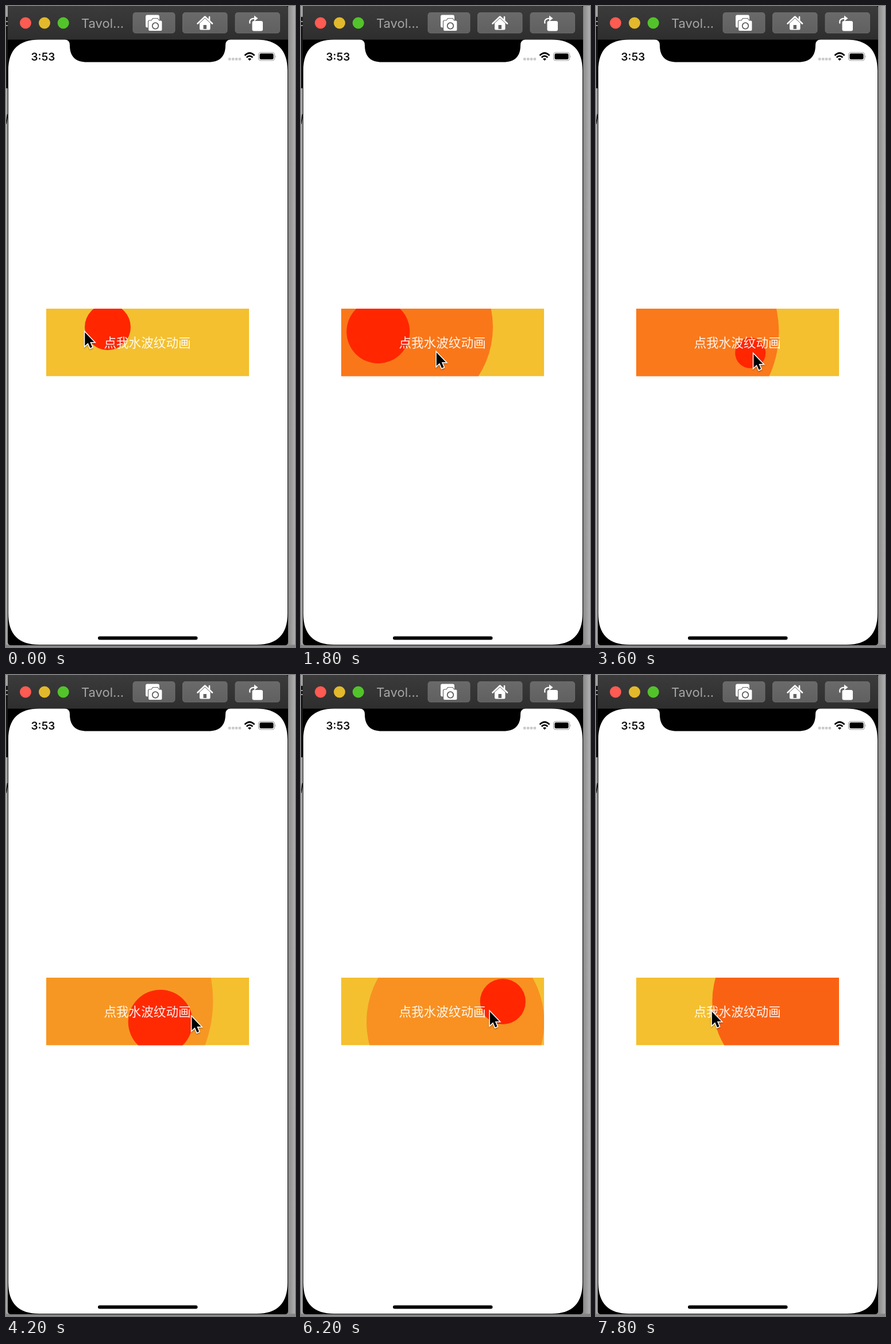
Animation of 503x1114 px, one loop 8000 ms. Source, as an HTML page:

```html
<!DOCTYPE html>
<html lang="zh-CN">
<head>
<meta charset="utf-8">
<title>Ripple button</title>
<style>
  html, body { margin: 0; width: 100%; height: 100%; overflow: hidden; background: #a5a5a5; }
  svg { display: block; width: 503px; height: 1114px; }
  .title { font: 22px Inter, "Liberation Sans", sans-serif; fill: #a6a6a6; }
  .clock { font: 600 19px Inter, "Liberation Sans", sans-serif; fill: #111; }
  .label { font: 21.6px "Noto Sans CJK SC", "Noto Sans CJK", sans-serif; fill: #fff; fill-opacity: .93; text-anchor: middle; }
</style>
</head>
<body>
<svg viewBox="0 0 503 1114">
  <defs>
    <linearGradient id="bar" x2="0" y2="1">
      <stop stop-color="#3b3b3b"/><stop offset="1" stop-color="#2e2e2e"/>
    </linearGradient>
    <linearGradient id="key" x2="0" y2="1">
      <stop stop-color="#6a6a6a"/><stop offset="1" stop-color="#606060"/>
    </linearGradient>
    <linearGradient id="shade">
      <stop stop-color="#858585"/><stop offset="1" stop-color="#b0b0b0"/>
    </linearGradient>
    <clipPath id="button"><rect x="70" y="526" width="353" height="117.5"/></clipPath>
    <filter id="drop" x="-50%" y="-50%" width="200%" height="200%">
      <feDropShadow dx="0" dy="1.5" stdDeviation="1.2" flood-opacity=".35"/>
    </filter>
  </defs>

  <!-- desktop behind the window -->
  <rect width="503" height="1114" fill="#a5a5a5"/>
  <rect y="18" width="4" height="125" fill="#161616"/>
  <path d="M0 18H3M0 27H3M0 34H3" stroke="#999" stroke-width="2"/>
  <path d="M0 205L3 188" stroke="#222" stroke-width="2"/>
  <rect x="490" width="13" height="1114" fill="url(#shade)"/>
  <rect y="1110" width="503" height="4" fill="#858585"/>

  <!-- window and screen -->
  <path d="M3 0H491V1105Q491 1111 485 1111H9Q3 1111 3 1105Z" fill="#000"/>
  <path d="M3 0H488Q491 0 491 4V58.5H3Z" fill="url(#bar)"/>
  <path fill="#fff" d="M4 112C4 76 22 58.500 58 58.500H102Q111 58.500 111 68C111 88 121 97.500 141 97.500H352C372 97.500 382 88 382 68Q382 58.500 391 58.500H436C472 58.500 490 76 490 112V1056C490 1092 472 1110 436 1110H58C22 1110 4 1092 4 1056Z"/>

  <!-- title bar -->
  <circle cx="34" cy="29.500" r="10" fill="#fe5b52"/>
  <circle cx="67" cy="29.500" r="10" fill="#e2b92c"/>
  <circle cx="99.700" cy="29.500" r="10" fill="#53c32b"/>
  <text class="title" x="131" y="37.500">Tavol...</text>
  <g fill="url(#key)" stroke="#747474" stroke-width=".8">
    <rect x="221" y="11.500" width="73" height="35.500" rx="4.500"/>
    <rect x="307.500" y="11.500" width="77.500" height="35.500" rx="4.500"/>
    <rect x="399" y="11.500" width="77.500" height="35.500" rx="4.500"/>
  </g>
  <g fill="#fff">
    <rect x="243" y="15.500" width="24" height="22" rx="3"/>
    <path d="M250 25H253L255.500 21.500H264L266.500 25H269.500Q272 25 272 27.500V41Q272 43.500 269.500 43.500H250Q247.500 43.500 247.500 41V27.500Q247.500 25 250 25Z" stroke="#656565" stroke-width="1.200"/>
    <circle cx="260" cy="34.500" r="5.300" stroke="#606060" stroke-width="1.800"/>
    <path d="M337 30L346.300 21.500L355.500 30V39.500Q355.500 41.500 353.500 41.500H339Q337 41.500 337 39.500Z"/>
    <path d="M333.500 30.500L346.300 18.500L359 30.500M354 19V25" fill="none" stroke="#fff" stroke-width="2.600" stroke-linecap="round" stroke-linejoin="round"/>
    <rect x="343.500" y="33" width="5.500" height="7" fill="#626262"/>
    <rect x="428.500" y="26" width="18.500" height="17.500" rx="3"/>
    <path d="M424.500 30.500C423 24 427 21.500 433 21.500" fill="none" stroke="#fff" stroke-width="2.200"/>
    <path d="M432 16.500L438.500 21.500L432 26.500Z"/>
  </g>

  <!-- status bar -->
  <text class="clock" x="43.500" y="94.500">3:53</text>
  <g fill="#cbcbcb">
    <rect x="387" y="90" width="4.500" height="4.500" rx="1"/>
    <rect x="393" y="90" width="4.500" height="4.500" rx="1"/>
    <rect x="398.800" y="90" width="4.500" height="4.500" rx="1"/>
    <rect x="404.600" y="90" width="4.500" height="4.500" rx="1"/>
  </g>
  <g fill="none" stroke="#000" stroke-width="2.700">
    <path d="M415.500 86Q424 77.500 432.500 86"/>
    <path d="M418.700 89.500Q424 84.300 429.300 89.500"/>
  </g>
  <path d="M421 92Q424 89.500 427 92L424 95Z"/>
  <rect x="439.500" y="80.700" width="28" height="14" rx="4" fill="none" stroke="#999" stroke-width="1.100"/>
  <rect x="441.400" y="82.600" width="24.200" height="10.200" rx="2.400"/>
  <path d="M468.700 85.500Q470.500 87.700 468.700 90Z" fill="#999"/>
  <rect x="160" y="1095.500" width="173.500" height="6" rx="3"/>

  <!-- button -->
  <g clip-path="url(#button)">
    <rect x="70" y="526" width="353" height="117.500" fill="#f4c030"/>
    <g id="ripples" fill="#ff2600"></g>
  </g>
  <text class="label" x="246" y="593">点我水波纹动画</text>

  <path id="cursor" filter="url(#drop)" d="M.8 2V25.500L6.200 20.400L10 29.300L13.500 27.800L9.800 19H17Z" stroke="#fff" stroke-width="3" paint-order="stroke"/>
</svg>
<script>
  const LOOP = 8000, STEP = 200;

  // reach: distance to the farthest corner; keys: [ms, radius]
  const ripples = [
    { x: 177, y: 558, reach: 260, keys: [[0, 40], [1200, 121], [1800, 157], [3000, 232], [3300, 251]] },
    { x: 134.3, y: 566, reach: 299, keys: [[1040, 0], [1800, 55], [3000, 142], [4200, 226], [5200, 295]] },
    { x: 268.7, y: 603, reach: 213, keys: [[3060, 0], [4200, 56], [5000, 95.3], [6200, 154.7], [7300, 209]] },
    { x: 351.3, y: 567.5, reach: 291, keys: [[5620, 0], [6200, 39.6], [7800, 149]] }
  ];

  // [ms, x, y] of the pointer tip
  const pointer = [
    [0, 136.5, 565], [1000, 134.5, 566], [1300, 142, 571], [1800, 235, 600],
    [2400, 272, 603], [3000, 273.5, 603], [3700, 273.5, 603], [4200, 322.5, 592],
    [4700, 349, 567], [5000, 351, 565], [5800, 351, 567], [6200, 328, 583],
    [7000, 250, 592], [7800, 201, 583]
  ];

  function sample(keys, t) {
    const i = keys.findIndex(k => k[0] >= t);
    if (i < 0) return keys[keys.length - 1].slice(1);
    if (i === 0) return keys[0].slice(1);
    const a = keys[i - 1], b = keys[i];
    const p = (t - a[0]) / (b[0] - a[0]);
    return a.slice(1).map((v, n) => v + (b[n + 1] - v) * p);
  }

  const layer = document.getElementById('ripples');
  const cursor = document.getElementById('cursor');
  for (const r of ripples) {
    r.el = document.createElementNS('http://www.w3.org/2000/svg', 'circle');
    r.el.setAttribute('cx', r.x);
    r.el.setAttribute('cy', r.y);
    layer.append(r.el);
  }

  function draw(t) {
    for (const { el, reach, keys } of ripples) {
      const [radius] = sample(keys, t);
      const alpha = 1.4 * (0.945 - radius / reach);
      el.setAttribute('r', radius);
      el.setAttribute('fill-opacity', Math.max(0, Math.min(1, alpha)));
    }
    cursor.setAttribute('transform', `translate(${sample(pointer, t)})`);
  }

  const start = performance.now();
  function tick() {
    const t = (performance.now() - start) % LOOP;
    draw(Math.floor(t / STEP) * STEP);
    requestAnimationFrame(tick);
  }
  tick();
</script>
</body>
</html>
```
